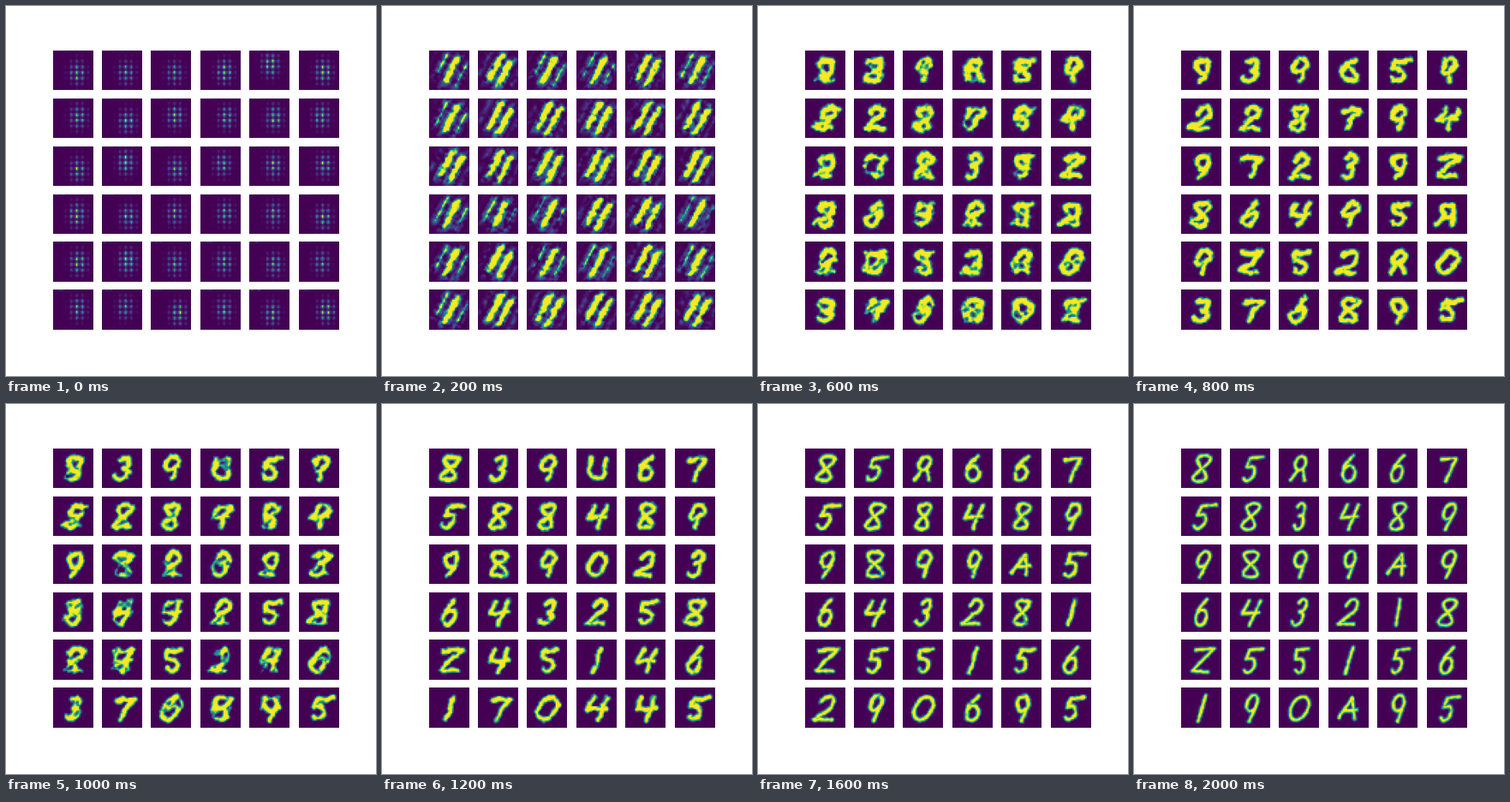
These frames come from a looping animation (432x432 px, 2.1 s). A matplotlib script:

```python
import numpy as np
import matplotlib.pyplot as plt
from matplotlib.animation import FuncAnimation

CELLS, GRID, FRAMES = 28, 6, 21
TILES = GRID * GRID
X, Y = np.meshgrid(np.arange(CELLS) - 14.0, np.arange(CELLS) - 14.0)


def line(*xy):
    return np.array(xy, float).reshape(-1, 2)


def arc(cy, r, start, end):
    """Arc around (0, cy); angles in degrees, 90 points down."""
    t = np.radians(np.linspace(start, end, 25))
    return np.column_stack([r * np.cos(t), cy + r * np.sin(t)])


def eight():
    t = np.linspace(0, 2 * np.pi, 50)
    return np.column_stack([0.7 * np.sin(2 * t), -np.cos(t)])


def pen(*parts):
    """Join parts into one stroke and sample it evenly by length."""
    pts = np.vstack(parts)
    s = np.r_[0, np.cumsum(np.hypot(*np.diff(pts, axis=0).T))]
    t = np.linspace(0, s[-1], 90)
    return np.column_stack([np.interp(t, s, pts[:, k]) for k in (0, 1)])


# Strokes in a box from -1 to 1
GLYPHS = {
    "0": [pen(arc(0, 0.9, 0, 360))],
    "1": [pen(line(0, -1, 0, 1))],
    "2": [pen(arc(-0.4, 0.6, -170, 40), line(-0.8, 0.9, 0.9, 0.9))],
    "3": [pen(arc(-0.5, 0.5, -150, 90), arc(0.45, 0.55, -90, 150))],
    "4": [pen(line(-0.6, -0.9, -0.9, 0.1, 0.9, 0)), pen(line(0.7, -0.9, 0.3, 1))],
    "5": [pen(line(1, -0.9, -0.4, -0.8, -0.5, -0.1), arc(0.4, 0.55, -90, 140))],
    "6": [pen(line(0.3, -1, -0.5, -0.2), arc(0.4, 0.6, 180, -180))],
    "7": [pen(line(-0.9, -0.7, 0.8, -0.8, 0, 1))],
    "8": [pen(eight())],
    "9": [pen(arc(-0.4, 0.6, 0, -360), line(0.2, 1))],
    "A": [pen(line(-0.9, 0.7, 0.1, -0.8, 0.8, 0.8)), pen(line(-0.5, 0.2, 0.8, 0.1))],
    "R": [pen(arc(-0.4, 0.55, 50, -310), line(0.8, 0.9)), pen(line(-0.2, 0.2, -0.7, 0.9))],
    "U": [pen(line(-0.7, -0.9), arc(0.2, 0.7, 180, 0), line(0.7, -0.9))],
    "Z": [pen(line(-0.9, -0.8, 0.9, -0.9, -0.7, 0.8, 0.9, 0.9))],
}

# Frame -> what the tiles resemble, row by row; I is one bar, H a pair
STAGES = {
    2: "IHIIHI IHHHHH HHHHHH IIIHHI IHIIHI IHHHHH",
    4: "281R89 522U59 2U8352 233222 202308 949002",
    8: "939659 228794 97239Z 86495R 9Z52R0 376895",
    12: "839U67 588489 989023 643258 Z45146 170445",
    16: "85R667 588489 9899A5 643281 Z55156 290695",
    20: "85R667 583489 9899A9 643218 Z55156 190A95",
}
KEYS = sorted(STAGES)


def early(i):
    """How unfinished the digits are: 1 at the first shapes, 0 at the end."""
    return (FRAMES - 1 - i) / 16


def bars(kind):
    """Distance to slanted parallel bars."""
    u = X + 0.52 * Y - 0.8
    gap = 8.6
    shift = gap / 2 if kind == "H" else 0
    n = np.round((u - shift) / gap)
    centre = n * gap + shift
    across = 0.88 * np.abs(u - centre)
    beyond = np.maximum(np.abs(Y - 0.45 * centre) - 7.5, 0)
    return np.hypot(across, beyond) + 0.5 * np.maximum(np.abs(centre) - 5, 0)


def digit(name, i, rng):
    """Distance to a handwritten glyph, looser and flatter when early."""
    loose = early(i)
    x, y = np.vstack(GLYPHS[name]).T
    width, slant = rng.normal(6.3 + loose, 0.4), rng.normal(0.25, 0.07)
    x, y = x * width, y * (9 - 1.8 * loose)
    phase = rng.uniform(0, 2 * np.pi)
    x = x - slant * y + 1.2 * loose * np.sin(0.5 * y + phase)
    y = y + loose * np.sin(0.5 * x + phase)
    return np.hypot(X[..., None] - x, Y[..., None] - y).min(axis=-1)


def stage(i):
    tiles = []
    for n, name in enumerate(STAGES[i].replace(" ", "")):
        rng = np.random.default_rng(n)
        tiles.append(bars(name) if name in "IH" else digit(name, i, rng))
    return np.array(tiles)


def grain(seed):
    """Slightly blurred noise for every tile, unit variance."""
    n = np.random.default_rng(seed).normal(size=(TILES, CELLS, CELLS))
    for axis in (1, 2):
        n = n + 0.6 * (np.roll(n, 1, axis) + np.roll(n, -1, axis))
    return n / n.std()


SHAPES = np.array([stage(k) for k in KEYS])
STEADY = grain(4)


def comb(v):
    """Peaks every four cells."""
    return (0.5 + 0.5 * np.cos(np.pi * v / 2)) ** 2


def lattice():
    """Untrained output: a dotted lattice right of the centre."""
    rng = np.random.default_rng(11)
    dots = (0.08 + comb(X - 2)) * (0.15 + comb(Y - 1.4))
    tiles = []
    for _ in range(TILES):
        cx, cy = rng.normal((2.5, -0.5), (1, 1.5))
        glow = np.exp(-((X - cx) / 5) ** 2 - ((Y - cy) / 7) ** 2)
        v = dots * glow * rng.uniform(0.5, 1, glow.shape)
        v = v / v.max()
        v[0] += 0.15 * rng.random(CELLS) * (X[0] < -6)
        tiles.append(v)
    return np.array(tiles)


def render(i):
    """All tiles at one frame, values from 0 to 1."""
    if i == 0:
        return lattice()
    if i == 1:
        return 0.5 * (lattice() + render(2))
    pos = np.interp(i, KEYS, range(len(KEYS)))
    a = min(int(pos), len(KEYS) - 2)
    f = pos - a
    d = -2 * np.log((1 - f) * np.exp(-SHAPES[a] / 2) + f * np.exp(-SHAPES[a + 1] / 2))

    loose = early(i)
    noise = 0.6 * STEADY + 0.8 * grain(100 + i)
    half = 1.2 + 0.9 * loose - 0.03 * loose * Y
    wobble = (0.2 + 0.4 * loose) * noise * np.exp(-d / 5)
    ink = (half - d + wobble) / 1.4 + 0.5
    haze = 0.55 * np.exp((2 - i) / 1.5) + 0.03
    mist = haze * np.exp(-d ** 2 / 14) * np.maximum(0.6 + 0.45 * noise, 0)
    return np.clip(np.maximum(ink, mist), 0, 1)


frames = [render(i) for i in range(FRAMES)]

fig, axes = plt.subplots(GRID, GRID, figsize=(6, 6), dpi=72, facecolor="white")
fig.subplots_adjust(left=0.125, right=0.9, bottom=0.125, top=0.88, wspace=0.2, hspace=0.2)
images = []
for ax, tile in zip(axes.flat, frames[0]):
    ax.axis("off")
    images.append(ax.imshow(tile, cmap="viridis", vmin=0, vmax=1))


def update(i):
    for im, tile in zip(images, frames[i]):
        im.set_data(tile)
    return images


anim = FuncAnimation(fig, update, frames=FRAMES, interval=100, repeat=True)
plt.show()
```
